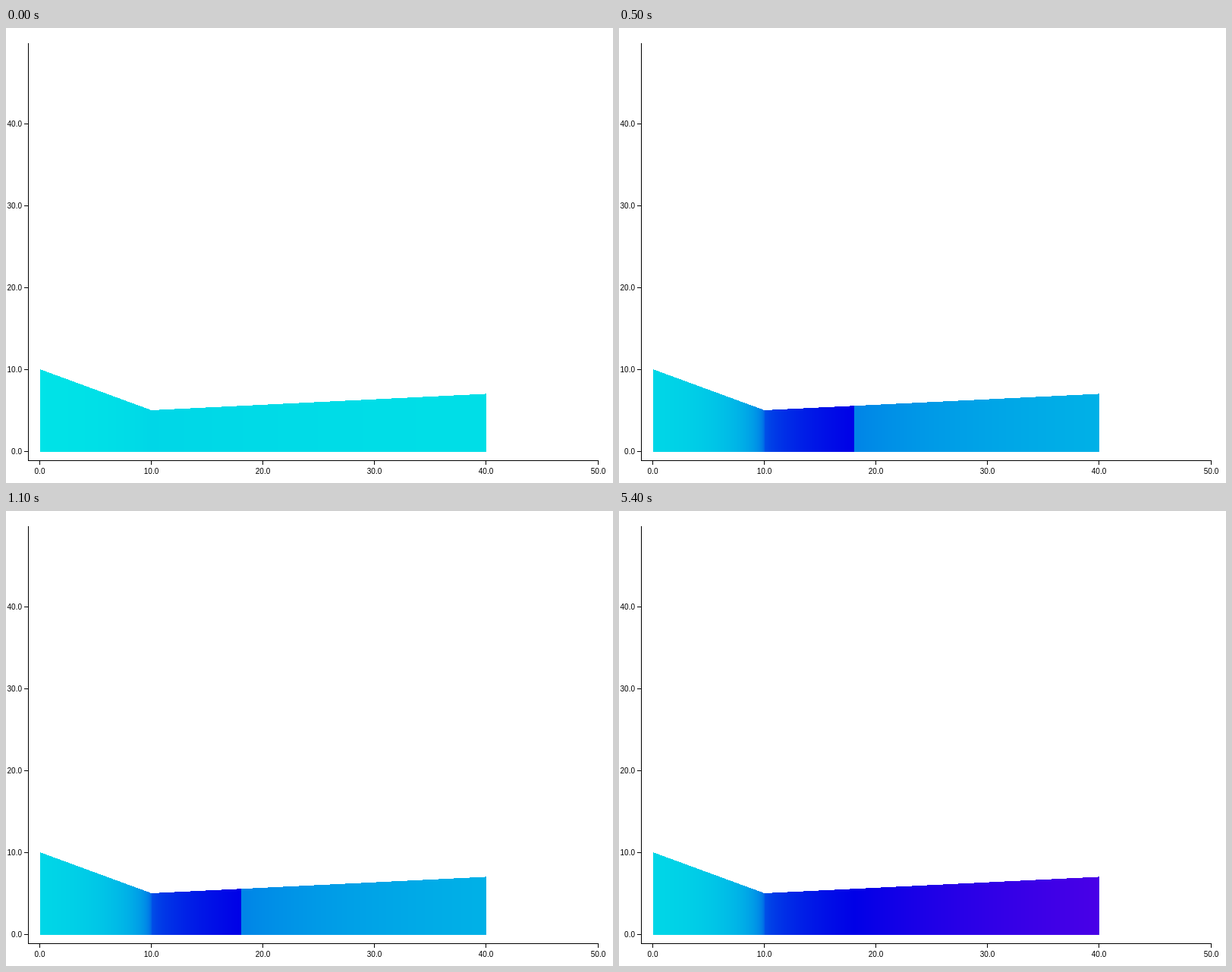
Recreate the animation shown at these times as an HTML page with a canvas. Size 800 by 600 pixels, loop 8000 ms.

```html
<!DOCTYPE html>
<html lang="en">
<head>
<meta charset="utf-8">
<title>Nozzle flow</title>
<style>
  html, body { margin: 0; width: 100%; height: 100%; overflow: hidden; background: #fff; }
  svg, canvas { position: absolute; left: 0; top: 0; width: 800px; height: 600px; }
  text { font: 10px "Liberation Sans", Arial, sans-serif; fill: #000; }
  path { stroke: #000; fill: none; shape-rendering: crispEdges; }
  canvas { visibility: hidden; animation: 8s step-end infinite; }
  #subsonic { animation-name: subsonic; }
  #shocked { animation-name: shocked; }
  #supersonic { animation-name: supersonic; }
  @keyframes subsonic { 0% { visibility: visible } 6.25%, 100% { visibility: hidden } }
  @keyframes shocked { 0% { visibility: hidden } 6.25% { visibility: visible } 18.75%, 100% { visibility: hidden } }
  @keyframes supersonic { 0% { visibility: hidden } 18.75%, 100% { visibility: visible } }
</style>
</head>
<body>
<canvas id="subsonic" width="800" height="600"></canvas>
<canvas id="shocked" width="800" height="600"></canvas>
<canvas id="supersonic" width="800" height="600"></canvas>
<svg id="chart" viewBox="0 0 800 600"></svg>
<script>
  const throat = 10, outlet = 40, shockAt = 18.05;
  const toX = value => 44.75 + 14.706 * value;
  const toY = value => 558 - 10.8 * value;
  const fromX = x => (x - toX(0)) / 14.706;

  // Nozzle height narrows from 10 to 5, then widens to 7.
  const area = x => x < throat ? 10 - x / 2 : 5 + (x - throat) / 15;

  // Isentropic flow of a gas with a heat capacity ratio of 1.4.
  const areaRatio = mach => ((5 + mach * mach) / 6) ** 3 / mach;
  const density = mach => (1 + mach * mach / 5) ** -2.5;

  function machFor(ratio, supersonic) {
    let [low, high] = supersonic ? [1, 4] : [0.01, 1];
    for (let i = 0; i < 40; i++) {
      const middle = (low + high) / 2;
      if ((areaRatio(middle) < ratio) === supersonic) low = middle;
      else high = middle;
    }
    return low;
  }

  // Share of the total pressure that is left behind a normal shock.
  function pressureKept(mach) {
    const square = mach * mach;
    return (6 * square / (square + 5)) ** 3.5 * (6 / (7 * square - 1)) ** 2.5;
  }

  const kept = pressureKept(machFor(area(shockAt) / area(throat), true));

  const flows = {
    subsonic: x => density(machFor(area(x) / 2.53, false)),
    shocked: x => x < shockAt
      ? flows.supersonic(x)
      : kept * density(machFor(area(x) * kept / area(throat), false)),
    supersonic: x => density(machFor(area(x) / area(throat), x > throat))
  };

  function color(rho) {
    const drop = 1 - rho;
    return `hsl(${180 + 90 * drop + 32 * drop * drop}, 100%, 45.2%)`;
  }

  for (const [id, flow] of Object.entries(flows)) {
    const pen = document.getElementById(id).getContext("2d");
    for (let column = Math.ceil(toX(0)); column < toX(outlet); column++) {
      const x = fromX(column + 0.5);
      const top = Math.round(toY(area(x)));
      pen.fillStyle = color(flow(x));
      pen.fillRect(column, top, 1, 559 - top);
    }
  }

  const chart = document.getElementById("chart");

  function add(tag, attrs, text = "") {
    const node = document.createElementNS("http://www.w3.org/2000/svg", tag);
    for (const key in attrs) node.setAttribute(key, attrs[key]);
    node.textContent = text;
    chart.appendChild(node);
  }

  let axes = "M29.5 20V571M29 570.5H781";
  for (let value = 0; value <= 50; value += 10) {
    const label = value.toFixed(1);
    const x = Math.floor(toX(value)) + 0.5;
    axes += `M${x} 571V576`;
    add("text", { x, y: 588, "text-anchor": "middle" }, label);
    if (value < 50) {
      const y = toY(value);
      axes += `M24 ${y + 0.5}H29`;
      add("text", { x: 21, y: y + 4, "text-anchor": "end" }, label);
    }
  }
  add("path", { d: axes });
</script>
</body>
</html>
```
